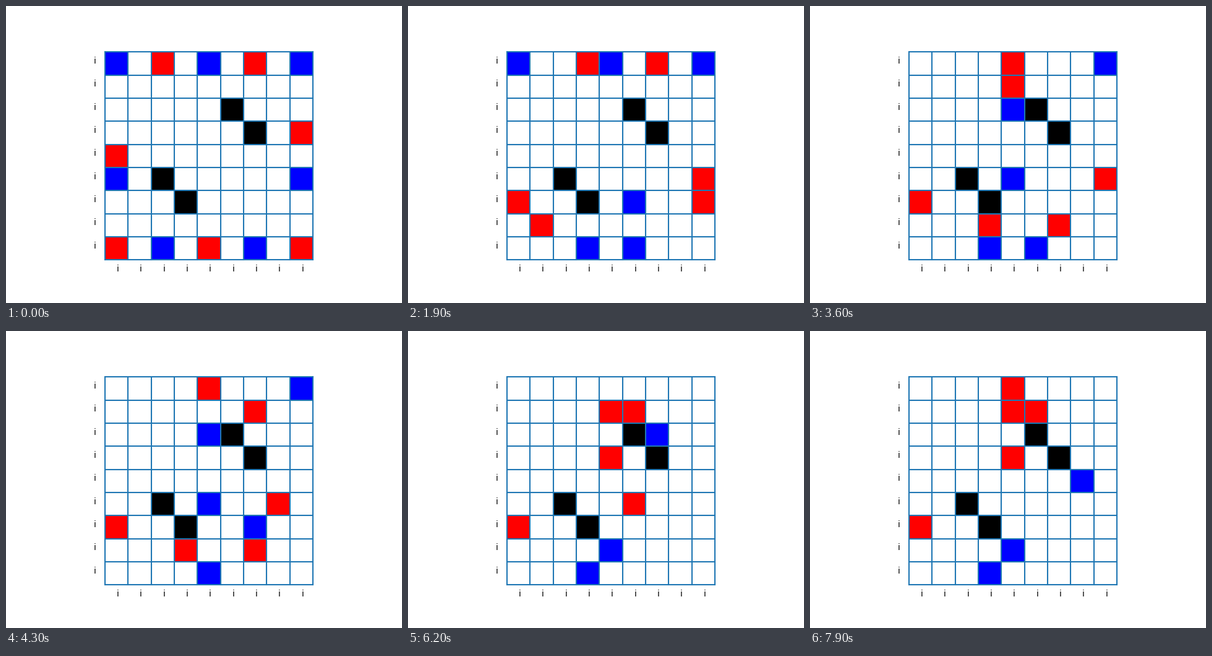
Recreate the animation shown at these times as a matplotlib script. Size 640 by 480 pixels, loop 8000 ms.

```python
import matplotlib.pyplot as plt
from matplotlib.animation import FuncAnimation

SIZE = 9
STEPS = 80
BLUE = ["00", "04", "08", "50", "58", "82", "86"]
RED = ["02", "06", "38", "40", "80", "84", "88"]
WALLS = ["25", "36", "52", "63"]

# Game record, blue first: from>to by row and column, x marks a captured piece.
GAME = """
82>83 38>48 86>85x84 88>78 50>51 40>50 51>61 50>60 58>57 48>58 57>67 78>68
61>71 02>03 71>81 80>70 67>66 70>71x81 66>65 06>05x04 65>55 68>67 00>10
05>04 10>11 04>14 11>21
03>04 55>54 67>77 21>22 77>76 22>23 71>72 23>24 72>73
85>75 58>57 75>65 14>15 83>84 15>16 65>66 57>56x66 84>83x73
04>14 54>64 56>55 64>54 16>15
54>64 55>45 64>74 45>44 08>07 44>34x24 07>17 76>75 17>27 75>65 27>26 65>55
26>27 34>33 27>37 33>23 37>47 23>13 47>48 13>03 48>47 55>54
47>48 03>04 48>47 54>44 47>48 44>34 48>47
""".split()


def replay():
    """Return the board after every move, starting position included."""
    board = {**dict.fromkeys(BLUE, "blue"), **dict.fromkeys(RED, "red"),
             **dict.fromkeys(WALLS, "black")}
    boards = [dict(board)]
    for move in GAME:
        path, _, taken = move.partition("x")
        start, end = path.split(">")
        board[end] = board.pop(start)
        if taken:
            del board[taken]
        boards.append(dict(board))
    return boards


boards = replay()

fig, ax = plt.subplots(figsize=(6.4, 4.8), dpi=100)
ax.set_aspect("equal")
ax.set_xlim(-0.45, SIZE + 0.45)
ax.set_ylim(-0.45, SIZE + 0.45)
ax.axis("off")

for k in range(SIZE + 1):
    ax.plot([0, SIZE], [k, k], color="C0", lw=1.5)
    ax.plot([k, k], [0, SIZE], color="C0", lw=1.5)
for k in range(SIZE):
    ax.text(k + 0.5, -0.5, "i")
    ax.text(-0.5, k + 0.5, "i")

cells = {}
for row in range(SIZE):
    for col in range(SIZE):
        cell = plt.Rectangle((col, SIZE - 1 - row), 1, 1, lw=0, visible=False)
        cells[f"{row}{col}"] = ax.add_patch(cell)


def update(i):
    board = boards[i]
    for key, cell in cells.items():
        cell.set_visible(key in board)
        cell.set_facecolor(board.get(key, "white"))
    return list(cells.values())


anim = FuncAnimation(fig, update, frames=STEPS, interval=100,
                     repeat=True, repeat_delay=0, blit=False)
plt.show()
```
